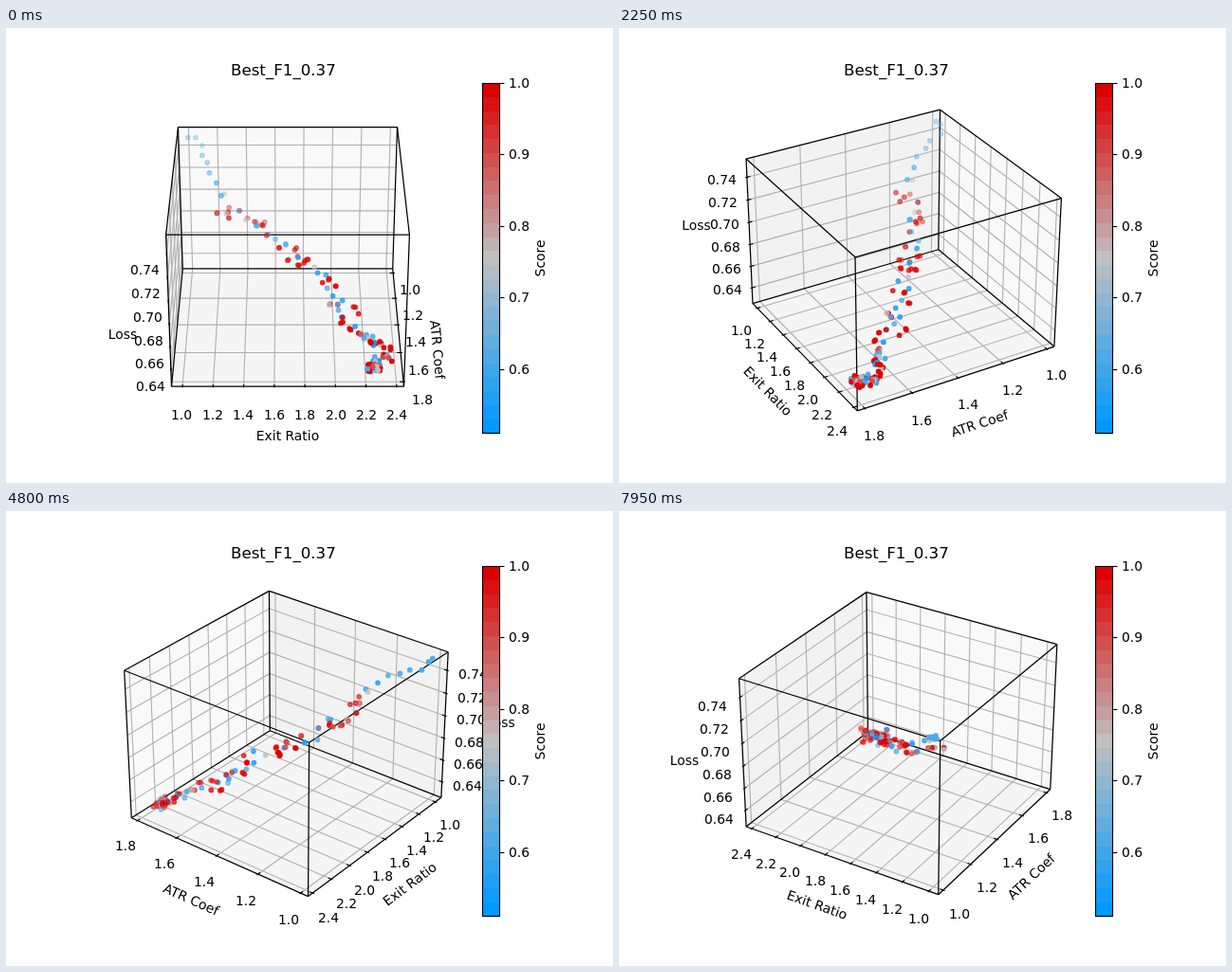
These frames come from a looping animation (640 px wide and 480 px high, 8 s). An HTML page with a canvas:

```html
<!DOCTYPE html>
<html lang="en">
<head>
<meta charset="utf-8">
<title>Rotating 3D scatter</title>
<style>
html, body { margin: 0; width: 100%; height: 100%; overflow: hidden; background: #fff; }
canvas { display: block; width: 640px; height: 480px; }
</style>
</head>
<body>
<canvas id="c" width="640" height="480"></canvas>
<script>
const ctx = document.getElementById('c').getContext('2d');
const STEP = 150, LOOP = 8000, DEG_PER_STEP = 4;
const FONT = '"DejaVu Sans", sans-serif';
const SMALL = 13.889, LINE = 1.11;

// Box half sizes, tick unit and label offsets, in world units.
const HALF = [0.5952, 0.5952, 0.4464];
const UNIT = [0.0952, 0.0952, 0.0714];
const AXES = [
  { name: 'ATR Coef', mid: 1.3986, scale: 1.3745, from: 1, step: 0.2, count: 5, digits: 1, tickDir: 1, flip: 1, pane: '#f9f9f9' },
  { name: 'Exit Ratio', mid: 1.6877, scale: 0.7841, from: 1, step: 0.2, count: 8, digits: 1, tickDir: 0, flip: 0, pane: '#f2f2f2' },
  { name: 'Loss', mid: 0.6906, scale: 6.829, from: 0.64, step: 0.02, count: 6, digits: 2, tickDir: 0, flip: 0, pane: '#f5f5f5' }
];
const SCORES = { b: 0.53, s: 0.61, g: 0.75, m: 0.9, r: 1 };

// Search trail (ATR, Exit, Loss) in thousandths of a world unit.
const TRAIL = [
  -537, -540, 412, -540, -499, 410, -523, -463, 372, -450, -461, 349,
  -408, -432, 326, -342, -419, 298, -304, -381, 258, -246, -355, 211,
  -270, -340, 209, -187, -376, 138, -239, -313, 143, -208, -318, 131,
  -176, -313, 114, -257, -262, 115, -238, -215, 79, -219, -226, 78,
  -219, -169, 64, -156, -168, 79, -172, -138, 75, -206, -123, 73,
  -119, -112, 40, -148, -66, 0, -55, -46, 0, -106, -10, -6,
  10, 0, -39, -91, 46, -21, -20, 56, -39, 32, 61, -56,
  0, 86, -62, -29, 102, -56, 36, 142, -65, 106, 157, -59,
  152, 182, -91, 67, 202, -94, 101, 218, -97, 114, 208, -148,
  91, 252, -149, 167, 237, -163, 210, 217, -191, 207, 262, -192,
  170, 287, -190, 193, 267, -235, 247, 282, -245, 294, 287, -246,
  170, 346, -229, 222, 371, -239, 336, 321, -259, 305, 351, -266
];
const TRAIL_KINDS = 'ssssssbbgrmrrsmgmbrmrsrbrrbrrrgbrbrsrbgrbsbrrrrb';

let seed = 11;
function rnd() {
  seed = (seed * 1664525 + 1013904223) % 4294967296;
  return seed / 4294967296;
}
const spread = r => (rnd() * 2 - 1) * r;
const pick = kinds => kinds[Math.floor(rnd() * kinds.length)];

const points = [];
function addPoint(x, y, z, kind) {
  points.push({ pos: [x, y, z], rgb: scoreColor((SCORES[kind] - 0.51) / 0.49) });
}

function scoreColor(v) {
  const low = [0, 153, 255], mid = [192, 192, 192], high = [221, 0, 0];
  const [a, b, t] = v < 0.5 ? [low, mid, v * 2] : [mid, high, v * 2 - 1];
  return a.map((c, i) => Math.round(c + (b[i] - c) * t)).join(',');
}

function buildPoints() {
  [...TRAIL_KINDS].forEach((kind, i) => {
    const [x, y, z] = TRAIL.slice(i * 3, i * 3 + 3).map(v => v / 1000);
    addPoint(x, y, z, kind);
    if (i > 8 && rnd() < 0.55) {
      addPoint(x + spread(0.012), y + spread(0.012), z + spread(0.008), pick('rrmgs'));
    }
  });
  for (let i = 0; i < 18; i++) {
    const t = i / 17;
    addPoint(0.34 + 0.08 * t + spread(0.025), 0.375 + 0.14 * t + spread(0.025),
      -0.278 - 0.045 * t + spread(0.01), pick('rrrmgsb'));
  }
  for (let i = 0; i < 12; i++) {
    addPoint(0.46 + spread(0.03), 0.495 + spread(0.047), -0.362 + spread(0.01), pick('rrrmgs'));
  }
  for (let i = 0; i < 36; i++) {
    addPoint(0.503 + spread(0.032), 0.443 + spread(0.035), -0.386 + spread(0.018), pick('rrrrmgsb'));
  }
}

// Camera: elevation 30 degrees, distance 10.
const SE = 0.5, CE = Math.sqrt(0.75);
let sa = 0, ca = 1;
function project([x, y, z]) {
  const f = x * ca + y * sa;
  const depth = 10 - f * CE - z * SE;
  const k = 1997.84 / depth;
  return [297 + (y * ca - x * sa) * k, 237.4 - (z * CE - f * SE) * k, depth];
}

function trace(pts) {
  ctx.beginPath();
  for (const p of pts) {
    const [x, y] = project(p);
    ctx.lineTo(x, y);
  }
}
function line(pts, color, width) {
  trace(pts);
  ctx.strokeStyle = color;
  ctx.lineWidth = width;
  ctx.stroke();
}

function text(str, x, y, size = SMALL, align = 'center') {
  ctx.font = size + 'px ' + FONT;
  ctx.fillStyle = '#000';
  ctx.textAlign = 'left';
  if (align === 'center') x -= ctx.measureText(str).width / 2;
  ctx.fillText(str, Math.round(x), Math.round(y));
}
function turnedText(str, x, y, angle, drop = 4) {
  ctx.save();
  ctx.translate(x, y);
  ctx.rotate(angle);
  ctx.font = SMALL + 'px ' + FONT;
  ctx.fillStyle = '#000';
  ctx.textAlign = 'center';
  ctx.fillText(str, 0, drop);
  ctx.restore();
}

const withAt = (p, i, v) => p.map((c, j) => j === i ? v : c);
const tickValues = a => Array.from({ length: a.count }, (_, i) => a.from + i * a.step);
const tickPos = (a, v) => (v - a.mid) * a.scale;
// Pushes a position away from the box centre on all axes but one.
const pushOut = (p, skip, amount) =>
  p.map((c, j) => j === skip ? c : c + Math.sign(c) * UNIT[j] * amount);

function drawBox(back) {
  const front = back.map(v => -v);
  AXES.forEach((a, i) => {
    const [j, k] = [0, 1, 2].filter(n => n !== i);
    const corner = (u, v) => withAt(withAt(back, j, u * HALF[j]), k, v * HALF[k]);
    trace([corner(-1, -1), corner(1, -1), corner(1, 1), corner(-1, 1)]);
    ctx.fillStyle = a.pane;
    ctx.fill();
  });
  AXES.forEach((a, i) => {
    const [j, k] = [0, 1, 2].filter(n => n !== i);
    for (const v of tickValues(a)) {
      const mid = withAt(back, i, tickPos(a, v));
      line([withAt(mid, j, front[j]), mid, withAt(mid, k, front[k])], '#b0b0b0', LINE);
    }
  });
  for (let i = 0; i < 3; i++) {
    const [j, k] = [0, 1, 2].filter(n => n !== i);
    for (const u of [-1, 1]) for (const v of [-1, 1]) {
      const p = withAt(withAt(back, j, u * HALF[j]), k, v * HALF[k]);
      line([p, withAt(p, i, front[i])], '#000', 1.25);
    }
  }
}

function drawAxis(a, i, back) {
  const edge = withAt(back, a.flip, -back[a.flip]);
  const d = a.tickDir, side = Math.sign(edge[d]) * UNIT[d];
  for (const v of tickValues(a)) {
    const p = withAt(edge, i, tickPos(a, v));
    line([withAt(p, d, p[d] + side * 0.1), withAt(p, d, p[d] - side * 0.2)], '#000', LINE);
    const [x, y] = project(pushOut(p, i, 1.037));
    text(v.toFixed(a.digits), x, y + 10.8);
  }
  const [x, y] = project(pushOut(withAt(edge, i, 0), i, 2.255));
  let angle = 0;
  if (i < 2) {
    const p = project(edge), q = project(withAt(edge, i, -edge[i]));
    angle = Math.atan((q[1] - p[1]) / (q[0] - p[0]));
  }
  turnedText(a.name, x, y, angle);
}

function drawPoints() {
  const seen = points.map(p => ({ at: project(p.pos), rgb: p.rgb }));
  seen.sort((a, b) => b.at[2] - a.at[2]);
  const far = 1 / seen[0].at[2], near = 1 / seen[seen.length - 1].at[2];
  ctx.lineWidth = 1.4;
  for (const { at: [x, y, depth], rgb } of seen) {
    const alpha = 0.3 + 0.7 * (1 / depth - far) / (near - far);
    ctx.fillStyle = ctx.strokeStyle = `rgba(${rgb},${alpha})`;
    ctx.beginPath();
    ctx.arc(x, y, 2.2, 0, Math.PI * 2);
    ctx.fill();
    ctx.stroke();
  }
}

function drawColorbar() {
  const left = 502, top = 58, width = 18, height = 369.5, bands = 25;
  for (let i = 0; i < bands; i++) {
    const y0 = Math.round(top + height * i / bands);
    const y1 = Math.round(top + height * (i + 1) / bands);
    ctx.fillStyle = `rgb(${scoreColor(1 - i / (bands - 1))})`;
    ctx.fillRect(left, y0, width, y1 - y0);
  }
  ctx.strokeStyle = '#000';
  ctx.lineWidth = LINE;
  ctx.strokeRect(left + 0.5, top + 0.5, width, height - 0.5);
  for (let i = 0; i < 5; i++) {
    const y = Math.round(top + i * 75.4) + 0.5;
    ctx.beginPath();
    ctx.moveTo(520.5, y);
    ctx.lineTo(525.4, y);
    ctx.stroke();
    text((1 - i * 0.1).toFixed(1), 530, y + 4.6, SMALL, 'left');
  }
  turnedText('Score', 568, 243, -Math.PI / 2, 0);
}

function draw(step) {
  const azim = step * DEG_PER_STEP * Math.PI / 180;
  sa = Math.sin(azim);
  ca = Math.cos(azim);
  const back = [ca >= 0 ? -HALF[0] : HALF[0], sa >= 0 ? -HALF[1] : HALF[1], -HALF[2]];
  ctx.fillStyle = '#fff';
  ctx.fillRect(0, 0, 640, 480);
  drawBox(back);
  AXES.forEach((a, i) => drawAxis(a, i, back));
  drawPoints();
  text('Best_F1_0.37', 292, 50, 16.667);
  drawColorbar();
}

buildPoints();
const start = performance.now();
let shown = -1;
function tick() {
  const step = Math.floor((performance.now() - start) % LOOP / STEP);
  if (step !== shown) draw(shown = step);
  requestAnimationFrame(tick);
}
tick();
</script>
</body>
</html>
```
